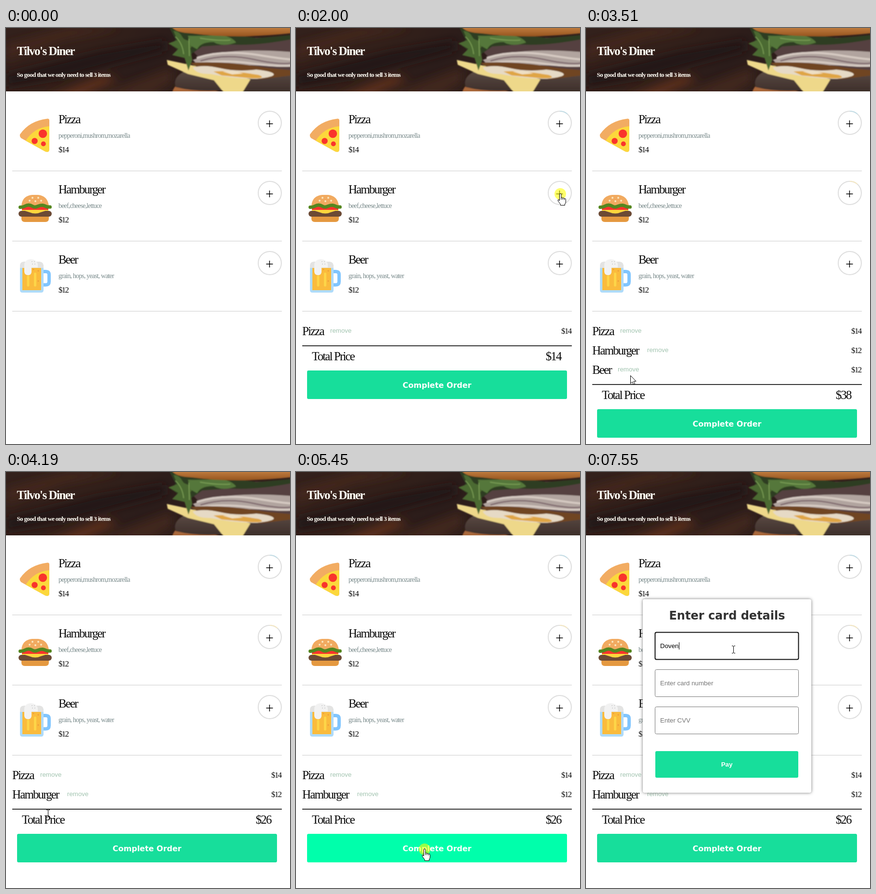
Recreate the animation shown at these times as an HTML page. Size 590 px wide and 860 px high, loop 8000 ms.

```html
<!DOCTYPE html>
<html lang="en">
<head>
<meta charset="utf-8">
<title>Diner order</title>
<style>
html, body { margin: 0; width: 100%; height: 100%; overflow: hidden; background: #fff; }
svg { display: block; }
text { font-family: "Liberation Serif", serif; letter-spacing: -.06em; fill: #0b0b0b; white-space: pre; }
.big { font-size: 25px; letter-spacing: -.075em; }
.price { font-size: 17px; letter-spacing: -.1em; }
.desc { font-size: 14px; fill: #7a8b8c; }
.end { text-anchor: end; }
.ui { font: 13.33px "Liberation Sans", Arial, sans-serif; letter-spacing: 0; fill: #757575; }
.remove { fill: #a2c4b0; }
.bold { font: bold 16px "DejaVu Sans", Verdana, sans-serif; letter-spacing: 0; fill: #fff; text-anchor: middle; }
.green { fill: #17de9b; }
.rule { stroke: #ccc; }
.field { fill: #fff; stroke: #767676; }
.field.on { stroke: #101010; stroke-width: 2; }
.panel { fill: #fff; filter: drop-shadow(0 0 3px #777); }
.hero text { font-weight: bold; fill: #fffdf4; }
</style>
</head>
<body>
<svg id="stage" width="590" height="860" viewBox="0 0 590 860">
  <defs>
    <linearGradient id="wood" x2="1" y2=".25">
      <stop stop-color="#33211c"/><stop offset=".35" stop-color="#33201a"/><stop offset=".6" stop-color="#2b1c1a"/><stop offset="1" stop-color="#33201b"/>
    </linearGradient>
    <linearGradient id="bun" x2="0" y2="1"><stop stop-color="#c98545"/><stop offset="1" stop-color="#96541f"/></linearGradient>
    <linearGradient id="patty" x2="0" y2="1"><stop stop-color="#5a4a43"/><stop offset="1" stop-color="#382a26"/></linearGradient>
    <filter id="soft" x="-20%" y="-60%" width="140%" height="220%"><feGaussianBlur stdDeviation="9"/></filter>
    <filter id="blend"><feGaussianBlur stdDeviation=".9"/></filter>
    <clipPath id="top"><path d="M0 0H590V131H0Z"/></clipPath>
  </defs>

  <g class="hero" clip-path="url(#top)">
    <path fill="url(#wood)" d="M0 0H590V131H0Z"/>
    <g filter="url(#soft)">
      <path fill="#42281d" d="M0 66L120 24 240 0H130L0 34Z"/>
      <path fill="#5a2f1a" d="M75 145L200 98 235 106 150 145Z"/>
      <path fill="#40261c" d="M180 140L345 82V112L300 140Z"/>
      <path fill="#241816" d="M0 96L190 50 330 26V46L120 102 0 122Z"/>
    </g>
    <g filter="url(#blend)">
      <path fill="#a9683a" d="M344 140Q347 112 376 112L470 140Z"/>
      <path fill="url(#patty)" d="M352 122Q346 99 375 88L600 92V140H505L460 128Q400 134 352 122Z"/>
      <path fill="#54403f" d="M362 20H600V92L420 82Z"/>
      <path fill="#b1a49f" d="M388 66Q460 38 600 50V80Q500 75 400 78Z"/>
      <path fill="none" stroke="#d6cac2" stroke-width="4" d="M396 62Q450 44 525 56T600 64M395 73Q450 65 510 73T600 77"/>
      <path fill="none" stroke="#7b656a" stroke-width="2.500" d="M404 68Q455 52 515 65T600 71"/>
      <path fill="#eed88a" d="M334 66L400 80 508 106 487 140H458L432 108 378 95 336 76Z"/>
      <path fill="#704523" d="M382 72Q450 67 540 82L600 88V97L530 106 420 94Z"/>
      <path fill="#e6dac6" d="M388 82Q410 75 445 83T520 86Q552 89 556 95T522 105Q470 105 425 95 396 96 388 82Z"/>
      <path fill="#dfa545" d="M431 90Q465 87 525 97 543 104 512 104L448 98Z"/>
      <path fill="#efe0c4" d="M450 90Q470 87 493 94L470 96Z"/>
      <path fill="#2f3d22" d="M340 0H373Q378 14 420 12T520 21L600 14V22Q520 38 465 34L408 38 376 60 344 36 352 24Z"/>
      <path fill="#4c6a32" d="M348 6Q360 6 366 18T396 25L383 42 387 66 379 88 371 62 345 56 358 43 337 32 356 25Z"/>
      <path fill="#55773a" d="M378 16Q410 17 444 14 470 18 478 30 450 40 431 29 404 29 397 44L383 36Z"/>
      <path fill="none" stroke="#83a75c" stroke-width="1.500" d="M352 18Q367 32 369 54M380 22L381 58M403 21Q440 27 466 25"/>
      <path fill="url(#bun)" d="M343-5Q350 10 385 11 480 24 600 10V-5Z"/>
    </g>
    <text x="22.500" y="56" font-size="25">Tilvo's Diner</text>
    <text x="22.500" y="101" font-size="13.300">So good that we only need to sell 3 items</text>
  </g>

  <g id="menu"></g>

  <g id="pizza">
    <path fill="#f2ac62" d="M90 191Q90 187 86 187.500 48 192 29 220 28 225 32 228L81 255Q90 259 90 250Z"/>
    <path fill="#fcd83c" d="M90 203Q58 206 41 233L81 255Q90 259 90 250Z"/>
    <g fill="#f9342c"><circle cx="76.500" cy="218.500" r="8.700"/><circle cx="59.500" cy="233.500" r="6.300"/><circle cx="77.700" cy="239.500" r="5"/></g>
  </g>

  <g id="burger">
    <path fill="#f1aa60" d="M32 367Q34 347 54 345H67Q86 347 89 367Z"/>
    <path fill="none" stroke="#fbe7bd" stroke-width="4" stroke-linecap="round" d="M55 351h0M67 351h0M49 357h0M61 358h0M73 357h0"/>
    <path fill="#e59940" d="M32 389H89V394Q89 401 82 401H39Q32 401 32 394Z"/>
    <path fill="#f8342c" d="M33 368H88V378H33Z"/>
    <path fill="#fdd63c" d="M33 376H88V380H76Q61 388 46 380H33Z"/>
    <rect x="26" y="378" width="69" height="12" rx="6" fill="#6c4a35"/>
    <path fill="#fdd63c" d="M36 377H85L72 381Q61 386 49 381Z"/>
    <path fill="none" stroke="#55871f" stroke-width="7" stroke-linecap="round" d="M29.500 370.500C39 371 39 366 47 366S55 371 61 370 69 366 76 366.500 82 371 91.500 370"/>
  </g>

  <g id="beer">
    <path fill="none" stroke="#80c5fe" stroke-width="7" d="M76 503.500H83Q89.500 503.500 89.500 510V524Q89.500 531 83 531H76"/>
    <path fill="#aedbfa" d="M29 490H78V542Q78 547 73 547H34Q29 547 29 542Z"/>
    <path fill="#fabb3d" d="M34 493H73V542H34Z"/>
    <path fill="none" stroke="#fdd548" stroke-width="5" stroke-linecap="round" d="M46 514V532M60.500 508V532"/>
    <path fill="#e3e3e2" d="M29 496V490Q30 483 38 483L70 483Q78 484 78 492V496Z"/>
    <path fill="#f2f2f2" d="M38 489Q39 479 51 478 63 478 66 488V495H53V505Q52 511 46 511 39 511 38 504Z"/>
    <path fill="none" stroke="#c9c9c9" stroke-width="2" stroke-linecap="round" d="M54 483h0M59 483h0M55 488h0M60 488h0"/>
    <path fill="none" stroke="#ee9b3c" stroke-width="3" stroke-linecap="round" d="M67 502h0M67 523h0M57 499h0"/>
  </g>

  <g id="cart"></g>

  <g id="total">
    <path stroke="#333" stroke-width="2" d="M13 657H573"/>
    <text class="big" x="33" y="687">Total Price</text>
    <text class="big end" x="550.500" y="687" id="sum"></text>
    <rect id="order" class="green" x="23" y="708" width="540" height="59" rx="3"/>
    <text class="bold" x="293" y="744">Complete Order</text>
  </g>

  <g id="modal">
    <rect class="panel" x="118" y="263" width="350" height="400" rx="4"/>
    <text class="bold" x="293" y="305" style="font-size:24px;fill:#333">Enter card details</text>
    <rect class="field" id="nameBox" x="143.500" y="331.500" width="298" height="56" rx="3"/>
    <rect class="field" x="143.500" y="408.500" width="298" height="56" rx="3"/>
    <rect class="field" x="143.500" y="485.500" width="298" height="56" rx="3"/>
    <text class="ui" id="name" x="154" y="364"></text>
    <text class="ui" x="154" y="441">Enter card number</text>
    <text class="ui" x="154" y="518">Enter CVV</text>
    <path id="caret" stroke="#000" d="M.5 352V367"/>
    <rect class="green" x="144" y="577" width="297" height="55" rx="3"/>
    <text class="ui" x="292.500" y="609" style="font-weight:bold;fill:#fff;text-anchor:middle">Pay</text>
  </g>

  <g id="pointer">
    <circle id="flash" r="12" fill="#ff0" opacity=".58"/>
    <path id="arrow" fill="#fff" stroke="#000" d="M.5 .5V17L4.300 13.500 6.700 19.200 9.400 18 7 12.300H12Z"/>
    <path id="hand" fill="#fff" stroke="#000" stroke-linejoin="round" d="M-1.500 14V1Q-1.500-.8 .2-.8T2 1V8Q4.200 6.800 5.200 8.500 7.500 7.500 8.400 9.400 11.500 9 11.500 12V16Q11.500 19 9.500 21V23.500H.5V21.500L-4.300 15Q-5.600 12.600-4.200 11.800-3 11.300-1.500 14ZM2 8V12M5.200 8.500V12M8.400 9.400V12.500"/>
    <path id="beam" fill="none" stroke="#000" d="M-3-7.500H-1L.5-6.500 2-7.500H4M.5-6.500V6.500M-3 7.500H-1L.5 6.500 2 7.500H4"/>
  </g>
</svg>

<script>
const LOOP = 8000, STEP = 70;
const $ = id => document.getElementById(id);
const show = (el, on) => { el.style.display = on ? '' : 'none'; };
const within = (x, y, x0, y0, x1, y1) => x >= x0 && x <= x1 && y >= y0 && y <= y1;

const items = [
  { name: 'Pizza', desc: 'pepperoni,mushrom,mozarella', price: 14, removeX: 71, glow: '#bcdce8' },
  { name: 'Hamburger', desc: 'beef,cheese,lettuce', price: 12, removeX: 127, glow: '#f7e7bb' },
  { name: 'Beer', desc: 'grain, hops, yeast, water', price: 12, removeX: 66 }
];

$('menu').innerHTML = items.map((item, i) => `<g transform="translate(0 ${145 * i})">
  <text class="big" x="109" y="197">${item.name}</text>
  <text class="desc" x="109" y="227">${item.desc}</text>
  <text class="price" x="109" y="257">$${item.price}</text>
  <circle cx="548" cy="196" r="24" fill="none" stroke="#dedede" stroke-width="2"/>
  <path class="glow" fill="none" stroke="${item.glow || 'none'}" stroke-width="1.500" d="M548 171.800A24 24 0 0 1 564 178"/>
  <path stroke="#000" stroke-width="1.500" d="M540.500 198H554.500M547.500 191V205"/>
  <path class="rule" d="M13 295.500H573"/></g>`).join('');

$('cart').innerHTML = items.map((item, i) => `<g transform="translate(0 ${40 * i})">
  <text class="big" x="13" y="635">${item.name}</text>
  <text class="ui remove" x="${item.removeX}" y="630">remove</text>
  <text class="price end" x="571.500" y="632">$${item.price}</text></g>`).join('');

const rows = [...$('cart').children];
const glows = [...document.querySelectorAll('.glow')];

// Cart size from each moment on
const sizes = [[0, 0], [1330, 1], [2080, 2], [2770, 3], [4190, 2]];
const clicks = [[1200, 1330], [1940, 2080], [2640, 2770], [4120, 4190], [5390, 5460], [6150, 6360]];
const keys = [7090, 7230, 7340, 7450, 7550];
const typed = 'Doven';
const OPEN = 5460, FOCUS = 6210;

// Pointer hotspot: time, x, y
const path = [
  [400, 577, 777], [470, 573, 640], [540, 571, 498], [720, 571, 498],
  [930, 574, 350], [1130, 553, 186], [1200, 553, 184], [1530, 553, 184],
  [1740, 558, 270], [1870, 550, 343], [2080, 548, 342], [2280, 546, 493],
  [2430, 546, 493], [2570, 546, 495], [3090, 546, 495], [3160, 520, 530],
  [3300, 290, 700], [3440, 125, 738], [3510, 92, 718], [3580, 88, 711],
  [3730, 87, 706], [4380, 87, 706], [4590, 190, 738], [4660, 246, 755],
  [4850, 267, 784], [5119, 267, 784], [5120, 267, 780], [5460, 267, 780],
  [5600, 275, 720], [5860, 318, 430], [5930, 322, 386], [6080, 305, 367],
  [6150, 306, 367]
];

function pointerAt(t) {
  const i = path.findLastIndex(p => p[0] <= t);
  if (i < 0) return null;
  const [t0, x, y] = path[i];
  if (i === path.length - 1) return [x, y];
  const [t1, x1, y1] = path[i + 1];
  const k = Math.floor((t - t0) / STEP) * STEP / (t1 - t0);
  return [x + (x1 - x) * k, y + (y1 - y) * k];
}

const overOrder = (x, y, n) => n > 0 && within(x, y, 23, 668 + 40 * n, 563, 727 + 40 * n);

function pointerKind(x, y, n, open) {
  if (open && within(x, y, 118, 263, 468, 663)) {
    if (within(x, y, 144, 577, 441, 632)) return 'hand';
    return [331, 408, 485].some(top => within(x, y, 143, top, 442, top + 57)) ? 'beam' : 'arrow';
  }
  const overAdd = items.some((_, i) => Math.hypot(x - 548, y - 196 - 145 * i) <= 26);
  const overRemove = items.some(({ removeX }, i) =>
    i < n && within(x, y, removeX, 618 + 40 * i, removeX + 45, 633 + 40 * i));
  if (overAdd || overRemove || overOrder(x, y, n)) return 'hand';
  return n && within(x, y, 33, 624 + 40 * n, 121, 652 + 40 * n) ? 'beam' : 'arrow';
}

function draw(t) {
  const n = sizes.findLast(s => s[0] <= t)[1];
  const open = t >= OPEN, focus = t >= FOCUS;
  const count = keys.filter(k => k <= t).length;

  rows.forEach((row, i) => show(row, i < n));
  glows.forEach((glow, i) => show(glow, t >= sizes[i + 1][0]));
  show($('total'), n);
  $('total').setAttribute('transform', `translate(0 ${40 * (n - 1)})`);
  $('sum').textContent = '$' + items.slice(0, n).reduce((sum, item) => sum + item.price, 0);

  show($('modal'), open);
  $('nameBox').classList.toggle('on', focus);
  $('name').textContent = count ? typed.slice(0, count) : 'Enter your name';
  $('name').style.fill = count ? '#000' : '';
  show($('caret'), focus && (t < 6760 || count));
  const caretX = count && open ? Math.round($('name').getComputedTextLength()) : 0;
  $('caret').setAttribute('transform', `translate(${154 + caretX} 0)`);

  const at = pointerAt(t);
  show($('pointer'), at);
  $('order').style.fill = at && overOrder(...at, n) ? '#00ffab' : '';
  if (!at) return;
  $('pointer').setAttribute('transform', `translate(${at.map(Math.round).join(' ')})`);
  const kind = pointerKind(...at, n, open);
  for (const id of ['arrow', 'hand', 'beam']) show($(id), id === kind);
  show($('flash'), clicks.some(([from, to]) => t >= from && t < to));
}

function tick() {
  draw(performance.now() % LOOP);
  requestAnimationFrame(tick);
}
tick();
</script>
</body>
</html>
```
